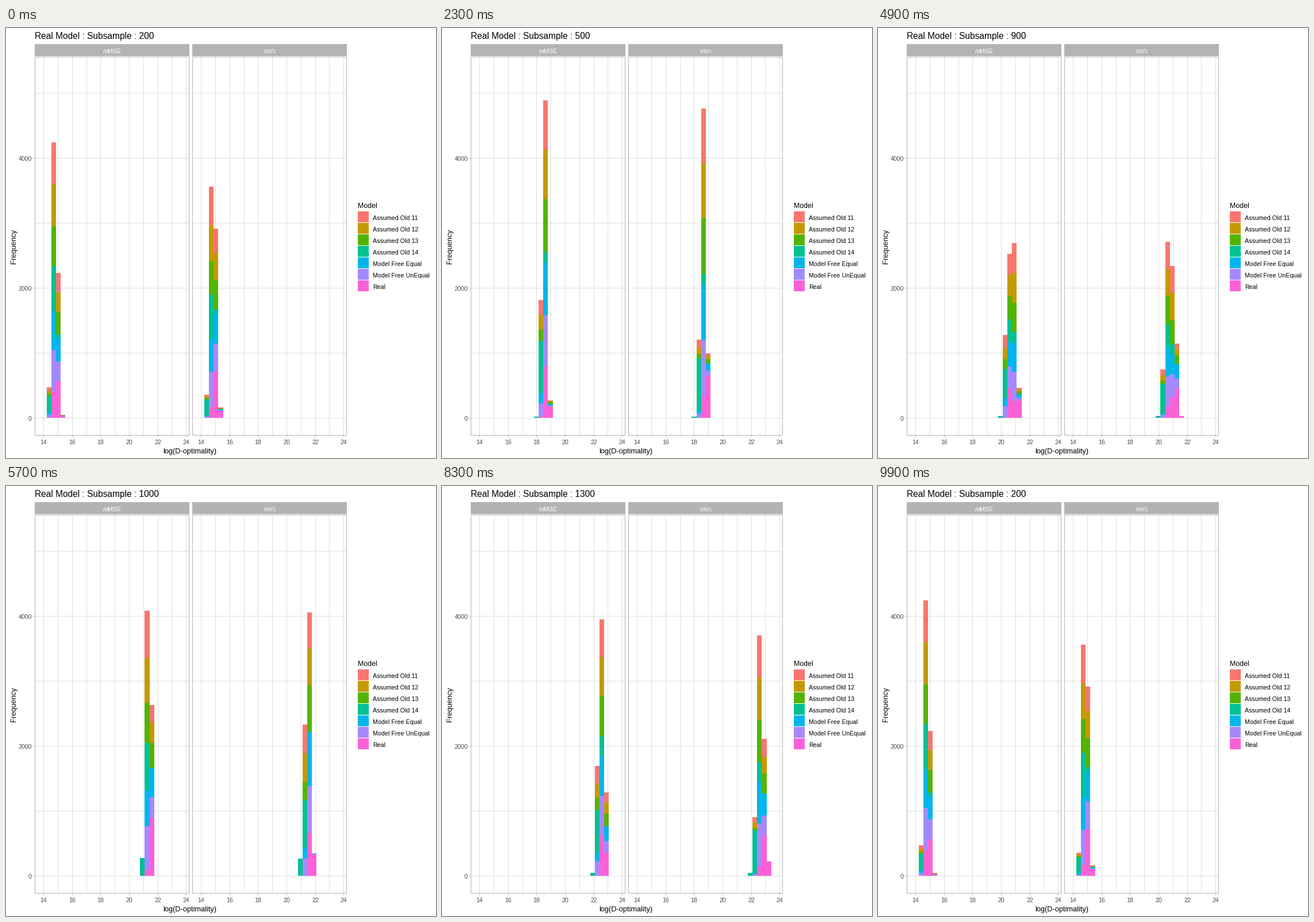
Write a matplotlib script that moves like this. It is 748 px wide and 748 px high and loops after 10000 ms.

```python
import math

import matplotlib.pyplot as plt
import numpy as np
from matplotlib.animation import FuncAnimation
from matplotlib.collections import PolyCollection
from matplotlib.patches import Rectangle

SIDE, DPI = 748, 100
PT = 72 / DPI                      # points per pixel
GREY, GRID = "#B3B3B3", "#DEDEDE"
MODELS = ["Assumed Old 11", "Assumed Old 12", "Assumed Old 13",
          "Assumed Old 14", "Model Free Equal", "Model Free UnEqual", "Real"]
COLORS = ["#F8766D", "#C49A00", "#53B400", "#00C094",
          "#00B6EB", "#A58AFF", "#FB61D7"]

# Layout in pixels
LEFT, WIDTH, TOP, BOTTOM = 50.5, 268, 50.5, 708.5
GAP = 274.4                        # offset between the two panels
BIN0, BIN_W, BINS = 62.48, 8.133, 30
ZERO, PER_COUNT = 678.5, 0.113

# Mean of every model, in bins, at the smallest and largest subsample
FIRST, LAST = 200, 1500
MEANS = [
    ([2.77, 2.76, 2.82, 2.31, 2.83, 2.78, 3.10],
     [27.82, 27.86, 27.91, 27.09, 27.96, 27.87, 28.38]),
    ([2.86, 2.92, 2.95, 2.31, 2.97, 2.93, 3.44],
     [28.05, 28.04, 28.17, 27.10, 28.31, 28.19, 28.97]),
]

STATES = list(range(FIRST, LAST + 1, 100))
STEPS = [4] * 3 + [3] * 3 + [2] + [3] * 7
HOLD = 4                           # still frames between two moves
STARTS = np.cumsum([HOLD] + [s + HOLD for s in STEPS[:-1]])
FRAMES, INTERVAL = 100, 100

cdf = np.vectorize(lambda z: 0.5 * (1 + math.erf(z / math.sqrt(2))))


def histogram(size, means):
    """Counts by bin and model for 1000 normal draws per model."""
    first, last = np.array(means)
    t = math.log(size / FIRST) / math.log(LAST / FIRST)
    mu = first + (last - first) * t + 0.36 * t * (1 - t)
    sd = 0.46 * (FIRST / size) ** 0.33
    edges = np.arange(BINS + 1)[:, None]
    return np.round(1000 * np.diff(cdf((edges - mu) / sd), axis=0))


COUNTS = np.array([[histogram(n, m) for m in MEANS] for n in STATES])

plt.rcParams["font.family"] = "Liberation Sans"
plt.rcParams["path.snap"] = False
fig = plt.figure(figsize=(SIDE / DPI, SIDE / DPI), dpi=DPI, facecolor="white")
ax = fig.add_axes([0, 0, 1, 1])
ax.set_xlim(0, SIDE)
ax.set_ylim(SIDE, 0)
ax.axis("off")


def label(x, y, s, size, color="black", ha="left", **kw):
    return ax.text(x, y, s, fontsize=size * PT, color=color, ha=ha,
                   va="baseline", **kw)


def line(x, y, color):
    ax.plot(x, y, color=color, lw=PT, zorder=1, solid_capstyle="butt")


def box(x, y, w, h, color):
    ax.add_patch(Rectangle((x, y), w, h, fc=color, ec="none"))


def mid(v):
    """Centre of the pixel that holds v."""
    return math.floor(v) + 0.5


def draw_panel(x0, name):
    x0, x1 = mid(x0), mid(x0 + WIDTH)
    box(x0 - 0.5, 28, x1 - x0 + 1, 21, GREY)
    label((x0 + x1) / 2, 44, name, 10.6, "white", "center")
    for k in range(6):
        y = ZERO - 1000 * k * PER_COUNT
        line([x0, x1], [y, y], GRID)
    for k in range(11):
        x = mid(x0 + 15.4 + 24.77 * k)
        line([x, x], [TOP, BOTTOM], GRID)
        if k % 2 == 0:
            line([x, x], [BOTTOM, BOTTOM + 3.5], GREY)
            label(x, 724, str(14 + k), 10.6, "#4D4D4D", "center")
    ax.add_patch(Rectangle((x0, TOP), x1 - x0, BOTTOM - TOP, fill=False,
                           ec=GREY, lw=PT, zorder=4))


draw_panel(LEFT, "mMSE")
draw_panel(LEFT + GAP, "mVc")
for v in (0, 2000, 4000):
    y = ZERO - v * PER_COUNT
    line([47, LEFT], [y, y], GREY)
    label(45, y + 4.3, str(v), 10.6, "#4D4D4D", "right")

label(319.5, 740, "log(D-optimality)", 12.8, ha="center")
label(17, 379.5, "Frequency", 12.8, ha="center", rotation=90,
      rotation_mode="anchor")
label(612, 312.5, "Model", 12.4)
for i, (name, color) in enumerate(zip(MODELS, COLORS)):
    box(612, 319 + 20 * i, 19, 19, color)
    label(638, 334 + 20 * i, name, 10.6)

title = label(50.5, 19, "", 15.5)
bars = ax.add_collection(PolyCollection([], edgecolors="none", linewidths=0,
                                        zorder=3), autolim=False)


def moment(frame):
    """Counts and nearest subsample size at a frame."""
    i = int(np.searchsorted(STARTS, frame, side="right")) - 1
    if i < 0:
        return COUNTS[0], STATES[0]
    j = (i + 1) % len(STATES)
    t = min(1, (frame - STARTS[i] + 1) / STEPS[i])
    return (1 - t) * COUNTS[i] + t * COUNTS[j], STATES[j if t >= 0.5 else i]


def update(frame):
    counts, size = moment(frame)
    polys, fills = [], []
    for p in range(2):
        for k in range(BINS):
            x0, x1 = (round(BIN0 + p * GAP + BIN_W * (k + d)) for d in (0, 1))
            stack = np.cumsum(counts[p, k, ::-1])
            ys = [round(ZERO - h * PER_COUNT) for h in (0, *stack)]
            for lo, hi, color in zip(ys, ys[1:], COLORS[::-1]):
                if hi < lo:
                    polys.append([(x0, lo), (x1, lo), (x1, hi), (x0, hi)])
                    fills.append(color)
    bars.set_verts(polys)
    bars.set_facecolor(fills)
    title.set_text(f"Real Model : Subsample : {size}")
    return bars, title


anim = FuncAnimation(fig, update, frames=FRAMES, interval=INTERVAL,
                     init_func=lambda: update(0), repeat=True,
                     repeat_delay=0)
plt.show()
```
